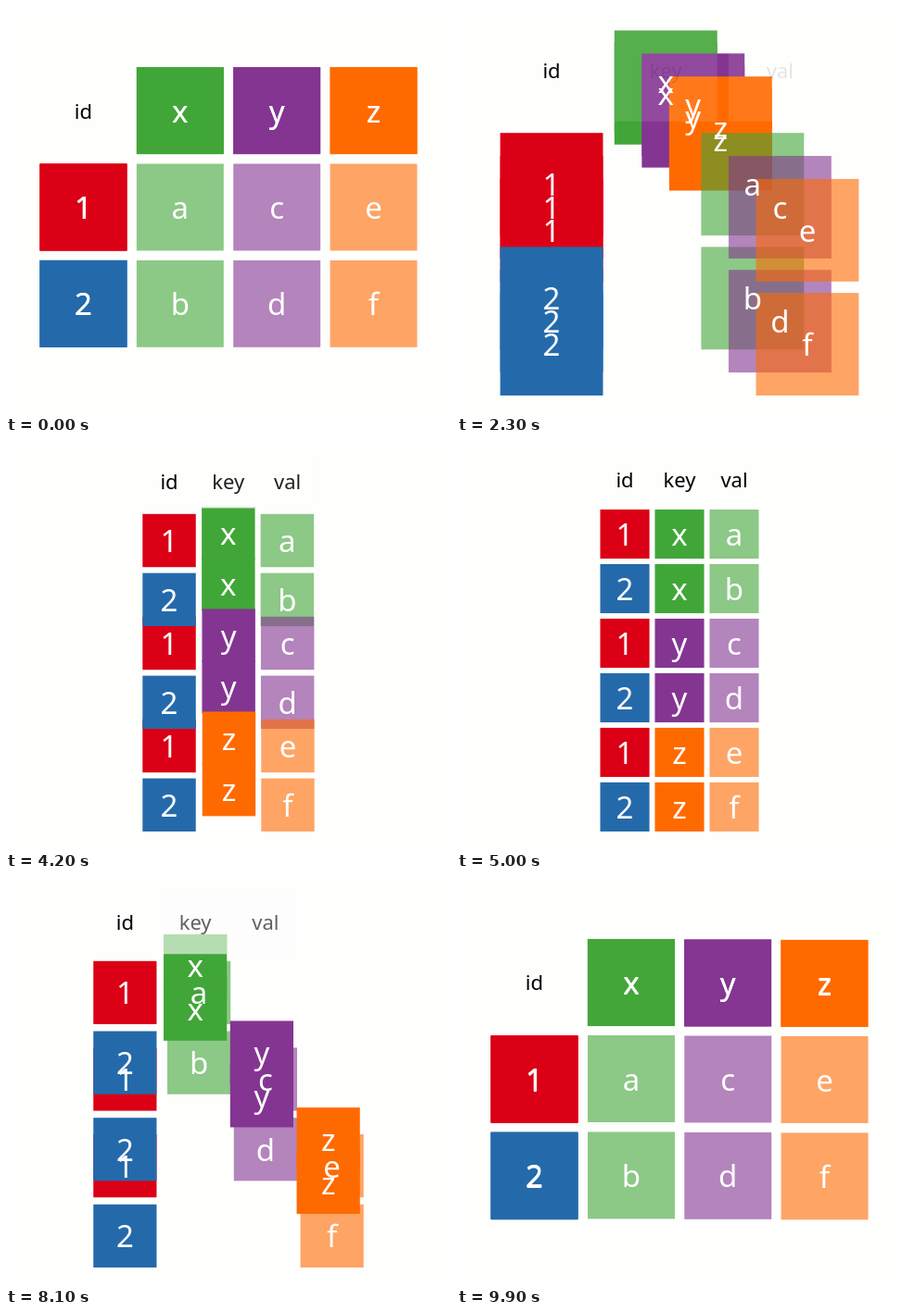
An HTML page with a canvas for the animation above (10 s loop, 480 by 441 pixels).

```html
<!DOCTYPE html>
<html lang="en">
<head>
<meta charset="utf-8">
<title>Wide and long tables</title>
<style>
  html, body { margin: 0; width: 100%; height: 100%; overflow: hidden; background: #fefefd; }
  canvas { display: block; width: 480px; height: 441px; }
</style>
</head>
<body>
<canvas id="stage" width="480" height="441"></canvas>
<script>
const ctx = document.getElementById('stage').getContext('2d');
const BG = '#fefefd';
const ID_COLORS = ['#db0015', '#246aab'];
const COL_COLORS = ['#41a638', '#843592', '#ff6a00'];
const FONT = '"Fira Sans", "Noto Sans", "Open Sans", sans-serif';
const LOOP = 10000, STEP = 100;
const BOX = 407, CX = 240, CY = 217.5;  // square the table is fitted into
const TILE = 0.9;

const expOut = t => t >= 1 ? 1 : 1 - 2 ** (-10 * t);
const sineInOut = t => (1 - Math.cos(Math.PI * t)) / 2;
const mix = (a, b, k) => a + (b - a) * k;

// How far the table is in its long form: h sideways, v up and down
function stateAt(ms) {
  const toLong = ms < 6700;
  const t = toLong
    ? Math.min(1, Math.max(0, (ms - 1600) / 3400))
    : (ms - 6700) / 3300;
  const h = expOut(t), v = sineInOut(t);
  return toLong ? { h, v, toLong } : { h: 1 - h, v: 1 - v, toLong };
}

// Cells in grid units; y grows downwards, the header row is 0
function cells(h, v) {
  const ids = [], keys = [], vals = [];
  for (let r = 0; r < 2; r++) {
    for (let c = 0; c < 3; c++) {
      const y = mix(1 + r, 1 + r + 2 * c, v);
      ids.push({ x: 1, y, text: '12'[r], fill: ID_COLORS[r], alpha: 1 });
    }
  }
  for (let c = 0; c < 3; c++) {
    for (let r = 0; r < 2; r++) {
      const row = 1 + r + 2 * c;
      keys.push({ x: mix(2 + c, 2, h), y: mix(0, row, v),
        text: 'xyz'[c], fill: COL_COLORS[c], alpha: 1 });
      vals.push({ x: mix(2 + c, 3, h), y: mix(1 + r, row, v),
        text: 'abcdef'[2 * c + r], fill: COL_COLORS[c], alpha: 0.6 });
    }
  }
  const heads = ['key', 'val'].map((text, i) =>
    ({ x: 2 + i, y: 0, text, fill: BG, alpha: v }));
  return { ids, keys, vals, heads };
}

function draw(ms) {
  const { h, v, toLong } = stateAt(ms);
  const { ids, keys, vals, heads } = cells(h, v);

  const w = 3.9 - h, ht = 2.9 + 4 * v;
  const s = BOX / Math.max(w, ht);
  const px = x => CX + (x - 0.55 - w / 2) * s;
  const py = y => CY + (y + 0.45 - ht / 2) * s;

  const tile = c => {
    ctx.globalAlpha = c.alpha;
    ctx.fillStyle = c.fill;
    ctx.fillRect(px(c.x - TILE / 2), py(c.y - TILE / 2), TILE * s, TILE * s);
  };
  const label = (c, size, color, alpha) => {
    ctx.globalAlpha = alpha;
    ctx.fillStyle = color;
    ctx.font = `${size}px ${FONT}`;
    ctx.fillText(c.text, px(c.x), py(c.y) + size * 0.38);
  };

  ctx.globalAlpha = 1;
  ctx.fillStyle = BG;
  ctx.fillRect(0, 0, 480, 441);
  ctx.textAlign = 'center';
  ctx.textBaseline = 'alphabetic';

  const layers = toLong ? [ids, keys, heads, vals] : [ids, vals, keys, heads];
  layers.flat().forEach(tile);

  label({ x: 1, y: 0, text: 'id' }, 22, '#000', 1);
  heads.forEach(c => label(c, 22, '#000', c.alpha));
  [...ids, ...keys, ...vals].forEach(c => label(c, 33, '#fff', 1));
}

function tick(now) {
  draw(Math.floor((now % LOOP) / STEP) * STEP);
  requestAnimationFrame(tick);
}
draw(0);
requestAnimationFrame(tick);
</script>
</body>
</html>
```
